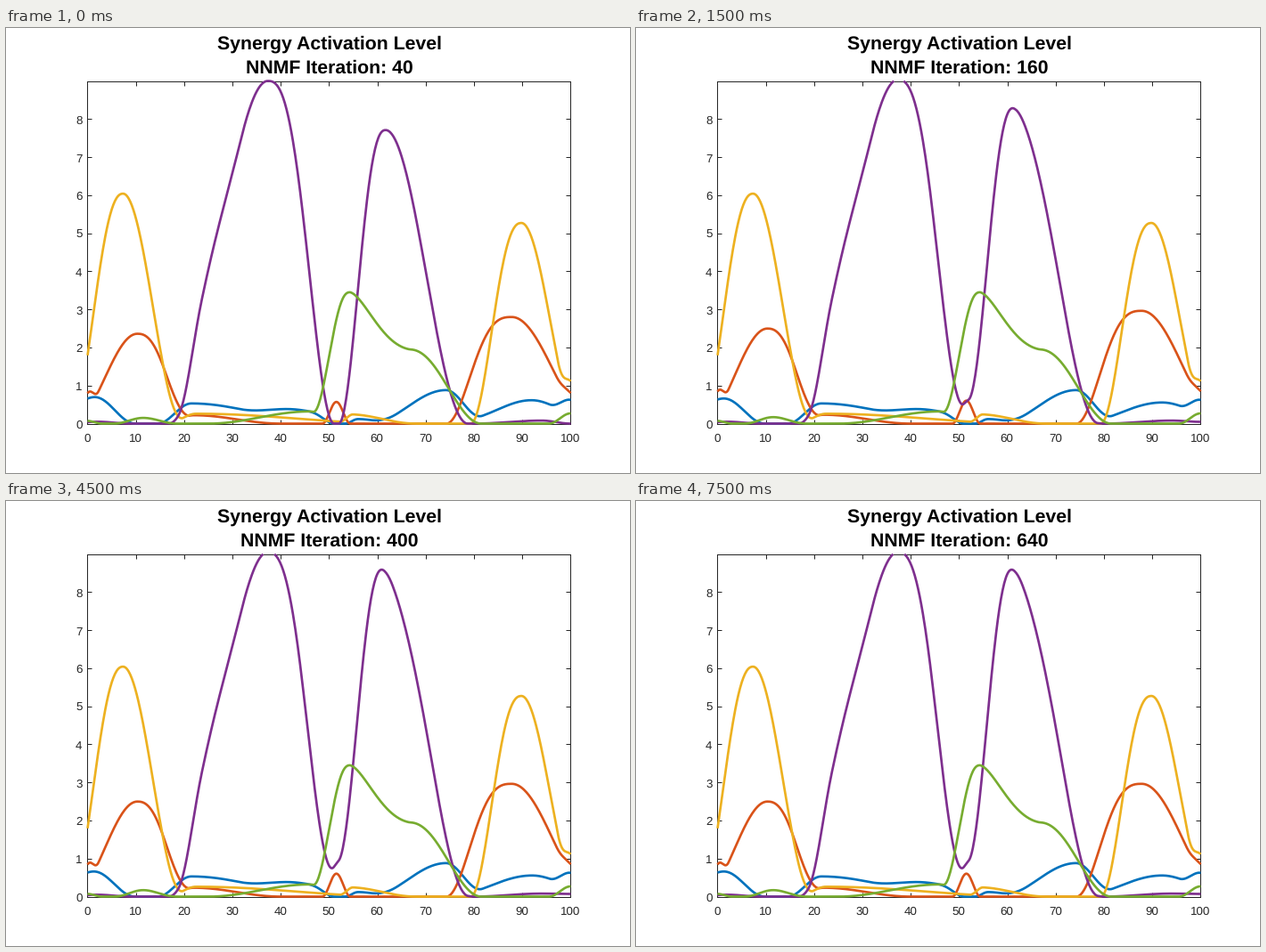
A matplotlib script that plays this animation: 700 by 500 pixels, repeating every 8 s.

```python
import numpy as np
import matplotlib.pyplot as plt
from matplotlib.animation import FuncAnimation

W, H, DPI = 700, 500, 100
FRAMES, STEP_MS = 16, 500
SETTLED = 5  # steps until the curves stop changing
PX = 72 / DPI
INK = "#262626"
# Just under half a pixel in, so data line up with the centre of the frame line.
LEFT, RIGHT, TOP, BOTTOM = 91.49, 633.49, 59.51, 444.51
Y_MAX = 9

plt.rcParams.update({"font.family": "Liberation Sans", "text.hinting": "none"})
X = np.linspace(0, 100, 601)


def hump(height, center, left, right, bend_l=1, bend_r=1):
    """Cosine bell with its own width and steepness on each side."""
    d = X - center
    u = np.clip(np.where(d < 0, -d / left, d / right), 0, 1)
    u = u ** np.where(d < 0, bend_l, bend_r)
    return height * np.cos(np.pi / 2 * u) ** 2


def wave(*humps):
    return sum(hump(*h) for h in humps)


blue = wave((.66, 1.3, 10, 8.5), (.53, 21.5, 7, 28), (.31, 44, 13, 7, 1, 1.6),
            (.12, 56, 2.7, 8), (.88, 74.2, 16, 7.6), (.555, 92, 17.6, 14),
            (.42, 100.5, 5, 1))
blue_extra = wave((.045, 3.3, 7, 7), (.06, 91.5, 9, 9))

red = wave((.47, 0, 1, 2.3), (2.36, 10.3, 13.6, 10.9, 1, 1.25), (.22, 22, 6, 18),
           (.57, 51.5, 2.9, 2.9), (2.8, 87.8, 13.5, 17.2, 1.39, 1),
           (.27, 100.5, 3.5, 1))

yellow = wave((6.04, 7.35, 10.9, 12.5, 1.16, 1), (.26, 22.5, 6, 42),
              (.21, 55, 2.8, 13), (5.27, 89.8, 10.5, 12.1, 1.2, 1),
              (.85, 100.5, 3.2, 3))

green = wave((.07, 0, 1, 3), (.15, 11.5, 6, 7), (.32, 46, 21, 6),
             (3.45, 54.3, 7.6, 12.5, 1.2, .9), (1.95, 66.5, 12, 15, 1, 1.1),
             (.27, 100, 4.5, 1))
green_extra = hump(.02, 11.5, 5, 5)

purple = wave((.05, 2, 6, 7), (1, 23.7, 5, 8.2), (Y_MAX, 37.3, 20.5, 13.7, 1, 1.335),
              (7.71, 61.7, 9.7, 17, 1.22, 1), (.08, 94, 14, 6))
purple_growth = wave((.05, 37.3, 5, 5), (1.3, 56, 11.5, 13.5), (.45, 70, 7, 10),
                     (.07, 100, 6, 1))


def levels(n):
    """The five activation curves at step n."""
    fast = min(n, 1)
    slow = 1 - (1 - min(n / SETTLED, 1)) ** 1.2
    top = purple + slow * purple_growth
    return (blue + (1 - fast) * blue_extra, red * (1 + .058 * fast), yellow,
            np.where(top > Y_MAX, np.nan, top), green + fast * green_extra)


fig = plt.figure(figsize=(W / DPI, H / DPI), dpi=DPI, facecolor="white")
ax = fig.add_axes([LEFT / W, 1 - BOTTOM / H, (RIGHT - LEFT) / W, (BOTTOM - TOP) / H])
ax.set(xlim=(0, 100), ylim=(0, Y_MAX), xticks=range(0, 101, 10), yticks=range(9))
ax.tick_params(direction="in", length=5.4 * PX, width=PX, color=INK, top=True,
               right=True, labelbottom=False, labelleft=False)
for spine in ax.spines.values():
    spine.set(linewidth=PX, edgecolor=INK)


def put(x, y, text, size, **style):
    return fig.text(x / W, 1 - y / H, text, fontsize=size * PX, va="baseline", **style)


for v in range(0, 101, 10):
    put(LEFT + v * (RIGHT - LEFT) / 100 - .5, 465, str(v), 13.33, ha="center", color=INK)
for v in range(9):
    put(85.5, BOTTOM - v * (BOTTOM - TOP) / Y_MAX + 5.5, str(v), 13.33, ha="right", color=INK)

put(363, 24, "Synergy Activation Level", 21.33, ha="center", weight="bold")
title = put(363, 51, "", 21.33, ha="center", weight="bold")

COLORS = ["#0072BD", "#D95319", "#EDB120", "#7E2F8E", "#77AC30"]
lines = [ax.plot([], [], color=c, lw=2.67 * PX, clip_on=False, zorder=3 + k,
                 solid_capstyle="butt")[0] for k, c in enumerate(COLORS)]


def draw(n):
    title.set_text(f"NNMF Iteration: {40 * (n + 1)}")
    for line, y in zip(lines, levels(n)):
        line.set_data(X, y)
    return [title, *lines]


anim = FuncAnimation(fig, draw, frames=FRAMES, interval=STEP_MS, repeat=True, repeat_delay=0)
plt.show()
```
